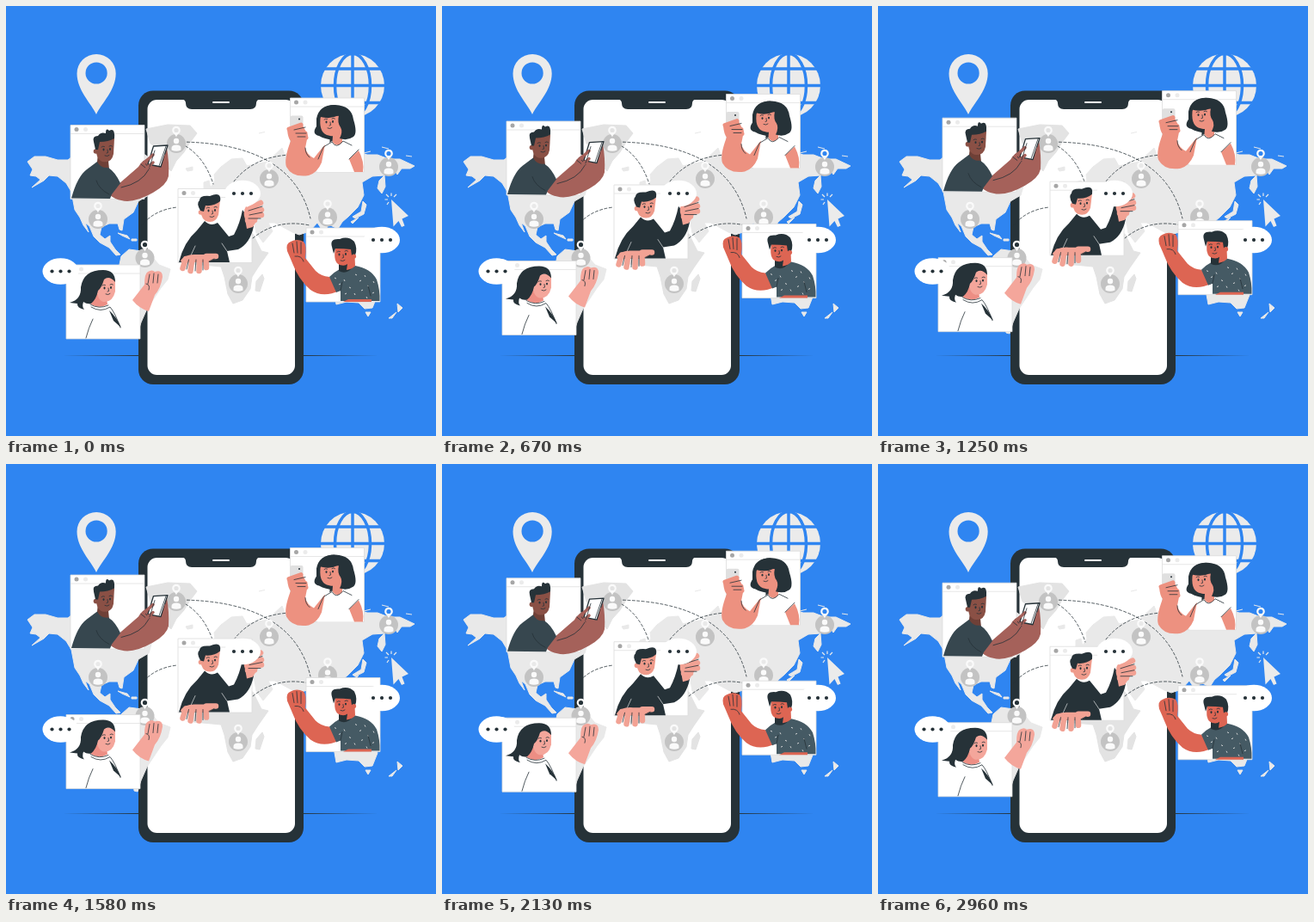
These frames come from a looping animation (500x500 px, 3 s). An HTML page:

```html
<!DOCTYPE html>
<html lang="en">
<head>
<meta charset="utf-8">
<title>Video call around the world</title>
<style>
html, body { margin: 0; width: 100%; height: 100%; overflow: hidden; background: #2f85f1; }
svg { display: block; width: 100%; height: 100%; }
.ink { fill: #263238; }
.line { fill: none; stroke: #263238; stroke-width: .8; stroke-linecap: round; stroke-linejoin: round; }
.land { fill: #e9e9e9; stroke: #e9e9e9; stroke-linejoin: round; }
.shade { fill: #e3e3e3; stroke: #e3e3e3; }
.fingers { fill: none; stroke-width: 6.5; stroke-linecap: round; stroke-linejoin: round; }
</style>
</head>
<body>
<svg viewBox="0 0 500 500">
<defs>
  <g id="window">
    <path d="M0 0H86V86H0Z" fill="#fff" stroke="#dcdcdc" stroke-width=".8"/>
    <path d="M0 10H86" stroke="#e0e0e0" stroke-width=".8"/>
    <circle cx="7" cy="5" r="2.5" fill="#a6a6a6"/>
    <circle cx="17.500" cy="5" r="2.500" fill="#ebebeb"/>
  </g>
  <g id="pin">
    <circle r="11" fill="#c3c3c3"/>
    <circle cy="-3" r="3.200" fill="#fafafa"/>
    <path d="M-5.500 7.500V5Q-5.500 1.500 0 1.500T5.500 5V7.500Q0 10-5.500 7.500Z" fill="#fafafa"/>
    <path fill="#fafafa" fill-rule="evenodd" d="M0-7.500C-1-11-4.800-12-4.800-15.500a4.800 4.800 0 0 1 9.600 0C4.800-12 1-11 0-7.500ZM-2.600-15.500a2.600 2.600 0 1 0 5.200 0a2.600 2.600 0 1 0-5.200 0Z"/>
  </g>
  <g id="bubble">
    <ellipse rx="21" ry="15.300" fill="#fff"/>
    <g class="ink"><circle cx="-10" r="2.100"/><circle r="2.100"/><circle cx="10" r="2.100"/></g>
  </g>
  <g id="face">
    <g class="ink"><ellipse cx="-3.500" cy="-1" rx="1" ry="1.400"/><ellipse cx="4" cy="-1.500" rx="1" ry="1.400"/></g>
    <path class="line" d="M-6-4Q-4.500-5.500-2.500-4.500M3-5Q5-6.500 6.500-5M1-1L1.500 2.500L0 3M-2 6Q1 7.500 3 5.500"/>
  </g>
</defs>

<!-- Location mark, globe, ground -->
<path fill="#ebebeb" fill-rule="evenodd" d="M105 126C99 113 82.500 98 82.500 78.500a22.600 22.600 0 0 1 45.200 0C127.700 98 111 113 105 126ZM92.500 78a12.600 12.600 0 1 0 25.200 0a12.600 12.600 0 1 0-25.200 0Z"/>
<circle cx="403" cy="92.500" r="37" fill="#ebebeb"/>
<g fill="none" stroke="#2f85f1" stroke-width="3.500">
  <path d="M403 55V130M365 92.500H441M370 73H436M370 112.500H436"/>
  <ellipse cx="403" cy="92.500" rx="20.500" ry="37"/>
</g>
<path class="ink" d="M66 406.500L160 406H340L433 406.500L340 407H160Z"/>

<!-- Phone -->
<rect class="ink" x="154" y="98.500" width="192" height="341.500" rx="17"/>
<rect x="164.500" y="109" width="171.500" height="320" rx="11" fill="#fff"/>
<path class="ink" d="M204 108Q209 109 209 113Q209 120 216 120H284Q291 120 291 113Q291 109 296 108Z"/>
<path d="M241 112H259" stroke="#fff" stroke-width="2" stroke-linecap="round"/>

<!-- World map -->
<g class="land">
  <path d="M25 181L33 175L46 175L60 179L72 179L90 165L140 160L160 172L172 180L182 197L170 206L166 220L154 227L148 240L137 248L135 261L132 260L130 253L120 253L111 257L109 266L115 271L121 267L121 274L127 283L133 289L128 290L120 281L109 275L102 268L97 256L92 252L96 263L90 255L86 246L80 237L76 216L70 206L60 198L50 197L44 203L30 211L40 202L35 198L28 197L31 190Z"/>
  <path class="shade" d="M163 143L188 138L214 139L222 148L213 160L207 170L198 180L192 192L184 184L180 168L168 160Z"/>
  <path d="M209 189L217 187L217 191L211 192ZM130 264L141 267L144 271L135 267ZM146 271H152V273H146Z"/>
  <path d="M134 291L143 283L158 285L171 293L178 301L191 306L188 318L180 328L172 340L164 352L157 368L153 381L149 380L146 350L138 330L130 310Z"/>
  <path d="M243 203L242 196L250 187L262 178L275 177L280 186L289 184L304 181L321 165L324 173L340 166L363 160L400 167L420 173L432 173L445 178L458 178L475 186L470 189L460 189L455 196L452 191L440 197L441 210L437 218L432 212L434 203L440 197L426 198L414 205L416 220L409 234L398 245L391 251L386 259L375 254L370 264L362 252L353 262L341 266L333 263L313 252L305 252L310 262L299 275L291 264L288 246L278 233L240 233L230 229L236 214Z"/>
  <path d="M230 205L236 203L238 212L230 215Z"/>
  <path class="shade" d="M210 275L225 262L287 265L297 285L305 287L293 304L286 315L284 329L275 342L264 346L258 335L254 315L250 303L218 300Z"/>
  <path class="shade" d="M298 312L300 317L295 332L290 331L291 320Z"/>
  <path d="M415 227L419 231L416 242L406 247L403 245L413 239ZM410 246L401 251L403 253Z"/>
  <path d="M380 324L400 315L425 320L432 336L426 351L417 352L410 345L396 344L384 347Z"/>
  <path d="M418 356H424L421 361ZM455 346L461 351L456 356ZM454 356L449 363L445 363Z"/>
  <path d="M294 148L301 146.500M416 171L424 169M437 164L445 166M465 174L472 175"/>
</g>
<path class="line" stroke-dasharray="3 2.500" d="M199 158Q229 170 241 207M199 158Q333 158 354 247M157 256Q172 237 199 234M265 204Q288 175 331 173M287 270Q315 247 353 255"/>
<use href="#pin" x="198" y="160"/>
<use href="#pin" x="107" y="248"/>
<use href="#pin" x="161.500" y="293"/>
<use href="#pin" x="306" y="201"/>
<use href="#pin" x="445" y="187"/>
<use href="#pin" x="374" y="245.500"/>
<use href="#pin" x="270" y="323"/>

<!-- Cursor -->
<path fill="#ebebeb" d="M448 225L450.500 256.500L456.500 250L460 257L463.500 255.500L460.500 247.500L468 244Z"/>
<path fill="none" stroke="#ebebeb" stroke-width="1.200" d="M445 222L442 219M448 221V217.500M451 222L454 219M444 225H440.500M445 228L443 231"/>

<g id="cards">
  <!-- Man with phone -->
  <g>
    <use href="#window" x="75" y="138.500"/>
    <path fill="#6f4037" d="M107 172L105 190Q112 196 120 190L119 180Z"/>
    <path fill="#8a5045" d="M105 158Q103 178 112 181Q123 183 125 172L126 154Q116 150 105 158Z"/>
    <circle cx="104.500" cy="169" r="2.800" fill="#8a5045"/>
    <path class="ink" d="M104 167L102 158Q100 151 107 151Q110 146 116 148Q116 141 120 145Q127 141 126 154Q119 158 109 158L107 167Z"/>
    <use href="#face" x="117" y="168"/>
    <path fill="#a5615a" d="M131 207L154 187Q158 179 169 175L178 184L187 165Q190 182 189 198Q187 208 171 217Q148 230 134 226Q127 225 121 220Z"/>
    <path fill="#37474f" d="M76 223.500Q83 198 94 190L106 181Q110 189 119 188Q127 193 133 206L123 219L121 224Z"/>
    <path class="line" d="M105 203Q108 213 120 219M134 211Q158 206 166 190M157 184L162 188M160 181L167 189"/>
    <path d="M171.500 163L188 162L180 187L165 184Z" fill="#fff" stroke="#263238" stroke-width="1.300" stroke-linejoin="round"/>
    <path class="fingers" style="stroke-width:3.500" stroke="#a5615a" d="M160 183L171 173M164 188L171 182M183 187L186 174"/>
    <path class="line" d="M167 187L173 168M178 186L186 163"/>
  </g>

  <!-- Woman with phone -->
  <g>
    <use href="#window" x="330.500" y="107"/>
    <path class="ink" d="M361 131Q364 115 382 115L392 130V154Q376 158 364 151Q355 149 361 140Z"/>
    <path class="ink" d="M377 147L376 164L390 160L391 144Z"/>
    <path fill="#ed9180" d="M366 127Q363 146 373 150Q380 152 380 151L379 163Q386 167 391 160V128Z"/>
    <path class="ink" d="M362 134Q363 115 383 115Q402 116 404 132Q409 148 404 152Q397 157 388 154Q392 146 389 141Q385 136 387 127Q377 132 366 129Z"/>
    <use href="#face" x="376" y="136"/>
    <path fill="#fff" d="M366 166L379 157Q385 166 392 157L405 164L414 193H362Z"/>
    <rect x="330.500" y="127.500" width="15" height="16" rx="2" fill="#e0e0e0"/>
    <circle class="ink" cx="341" cy="131.500" r="1"/>
    <path fill="#ed9180" d="M371 161Q365 168 358 177Q350 173 348 165L351 150L345 139L327 144Q328 154 331 157Q323 178 326 187Q333 200 352 197Q362 194 367 182Z"/>
    <path fill="#ed9180" d="M399 178L410 168Q417 181 415 193H405Z"/>
    <path class="fingers" style="stroke-width:5" stroke="#ed9180" d="M329 143L343 138M332 148H348M335 153H349"/>
    <path class="line" d="M335 144L348 141M337 148H349M339 152H348M348 165Q348 172 353 176M363 178L369 164L379 158Q384 167 392 157L402 162M399 178L410 167"/>
  </g>

  <!-- Man in turtleneck -->
  <g>
    <use href="#window" x="200" y="212.500"/>
    <path fill="#ef9b8b" d="M227 231Q225 246 232 250Q243 254 247 243L249 226Z"/>
    <circle cx="226.500" cy="240" r="2.800" fill="#ef9b8b"/>
    <path class="ink" d="M226 238Q221 229 225 226Q225 220 237 221Q251 215 249 227Q242 233 232 232L230 239Z"/>
    <use href="#face" x="239" y="239"/>
    <path class="ink" d="M201 298Q207 274 222 261L231 250Q238 257 246 252L259 268L265 266Q272 253 275 237L288 256Q284 276 270 283L257 285L260 298Z"/>
    <path class="line" style="stroke:#fff;stroke-width:.6" d="M257 285L251 276M215 290L220 279"/>
    <path fill="#f2a294" d="M279 233Q275 241 278 248L280 259L287 257L295 244Z"/>
    <path class="fingers" stroke="#f2a294" d="M281 237L296 229M282 240L297 237M282 244L297 243M281 249L289 249"/>
    <path class="line" d="M282 238L298 233M283 243L298 240M282 247H296"/>
    <path fill="#f2a294" d="M203 296Q208 288 222 289L242 289V294L235 298H204Z"/>
    <path class="fingers" stroke="#f2a294" d="M209 294L205.500 305M216.500 293L214.500 308M225 293L224.500 308M232.500 293L233 304M233 291L244 291"/>
    <path class="line" d="M212.500 295L210 306M221 295L220 308M229 295V307M236 297L242 294"/>
  </g>

  <!-- Woman with long hair -->
  <g>
    <use href="#window" x="70" y="301"/>
    <path fill="#ed8e84" d="M105 334L98 346Q108 353 118 347L117 340Z"/>
    <path fill="#f4a69b" d="M106 322Q104 341 113 344Q124 345 127 332V319Q119 311 106 322Z"/>
    <path class="ink" d="M74 345Q88 341 87 327Q90 307 113 307Q127 307 127 321Q120 313 114 318Q111 328 107 331Q105 341 99 346Q94 347 90 344Q88 350 91 353Q82 351 83 346Z"/>
    <use href="#face" x="118" y="329"/>
    <path class="line" d="M93 386Q96 374 101 364M98 347Q108 353 119 348M99 350Q110 357 121 350Q127 357 133 374"/>
    <path class="ink" d="M120 354Q129 362 134 374L125 366Z"/>
    <path fill="#f4a69b" d="M147 342L161 324Q161 311 165 309Q170 306 173 309Q182 306 182 315Q180 328 173 336L166 355Q155 352 147 342Z"/>
    <path class="line" d="M167 312L165 323M172 311L171 322M177 312L176 322M163 323Q168 324 166 330"/>
  </g>

  <!-- Man in patterned shirt -->
  <g>
    <use href="#window" x="349" y="258"/>
    <path fill="#dd6553" d="M376 315Q366 314 360 308L348 293Q350 278 346 274Q338 270 331 274Q325 276 327 285Q331 294 333 299Q340 318 354 330Q368 340 388 331Z"/>
    <path fill="#455a64" d="M376 315Q382 309 388 306Q396 308 406 302Q424 305 431 318Q435 330 434.500 343H389V331L384 333Z"/>
    <path class="ink" d="M387 298V308Q396 313 404 303L403 291Z"/>
    <path fill="#dd6553" d="M383 281Q380 298 388 301Q394 303 397 300L396 307Q403 306 406 302L405 279Z"/>
    <path class="ink" d="M381 288L379 280Q376 270 388 271Q398 267 405 274Q409 282 406 290L402 290L401 283Q393 282 383 282Z"/>
    <circle cx="404.500" cy="291" r="2.600" fill="#dd6553"/>
    <use href="#face" x="391" y="290"/>
    <path fill="#dd6553" d="M392 344L398 341H425V344Z"/>
    <path stroke="#e0e0e0" fill="none" stroke-width=".9" d="M382 316l2 1M387 324l2-1M393 318l1 2M399 327l2 1M394 335l2-1M406 312l2 1M411 320l2-1M405 334l1 2M417 313l1 2M420 325l2 1M413 331l2-1M427 320l1 2M426 334l2-1M419 338l1 2"/>
    <path class="line" d="M333 276L335 287M338 274L339 287M343 275L343 288M336 291Q344 290 346 297M389 331L391 321M421 325L424 337"/>
  </g>
</g>

<use href="#bubble" x="63.500" y="308.500"/>
<use href="#bubble" x="275" y="218"/>
<use href="#bubble" x="437" y="272"/>
</svg>
<script>
const LOOP = 3000, RISE = 10;
const cards = document.getElementById('cards');

// Constant-speed float: up for half the loop, then back down.
function draw() {
  const p = performance.now() % LOOP / LOOP;
  const lift = RISE * (1 - Math.abs(1 - 2 * p));
  cards.setAttribute('transform', `translate(0 ${-lift})`);
  requestAnimationFrame(draw);
}
draw();
</script>
</body>
</html>
```
